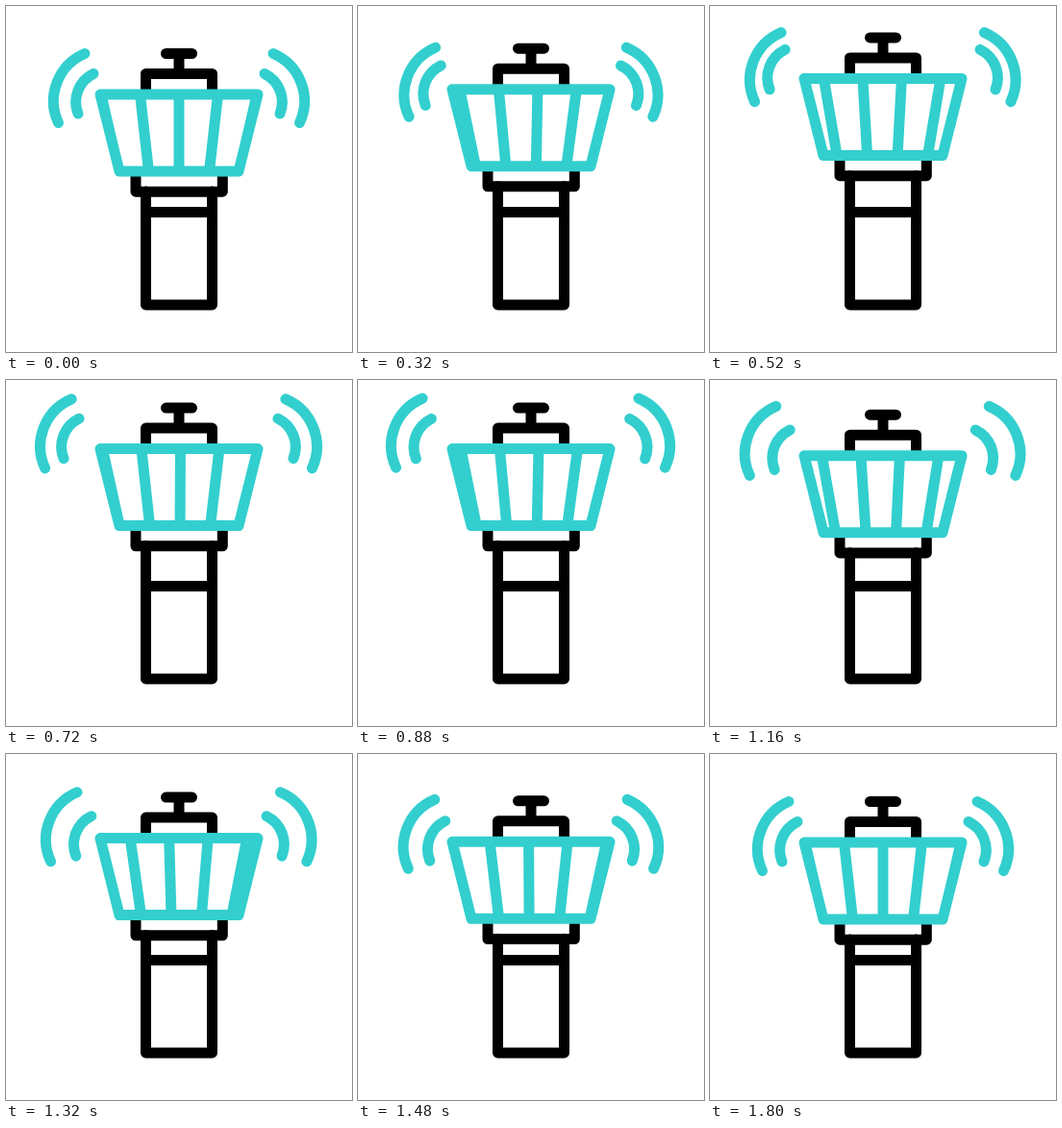
Animation, 360 px wide and 360 px high, one loop 2000 ms. Source, as an HTML page:

```html
<!DOCTYPE html>
<html lang="en">
<head>
<meta charset="utf-8">
<title>Control tower</title>
<style>
  html, body { margin: 0; width: 100%; height: 100%; overflow: hidden; background: #fff; }
  svg { display: block; width: 100%; height: 100%; }
  .line { fill: none; stroke-width: 11; stroke-linecap: round; stroke-linejoin: round; }
  .dark { stroke: #000; }
  .teal { stroke: #32cfce; }
</style>
</head>
<body>
<svg viewBox="0 0 360 360">
  <defs>
    <clipPath id="window"><path d="M98 92H262L242 172H118Z"/></clipPath>
  </defs>
  <path id="shaft" class="line dark"/>
  <path class="line dark" d="M145.5 214.5H214.5"/>
  <g id="head">
    <path class="line dark" d="M166.5 49.5H193.5M180 49.5V70M145.5 88V70.5H214.5V88M135 174V193.2H225.3V174"/>
    <path d="M98 92H262L242 172H118Z" fill="#fff"/>
    <path id="bars" class="line teal" clip-path="url(#window)"/>
    <path class="line teal" d="M98 92H262L242 172H118Z"/>
    <g id="waves" class="line teal"></g>
  </g>
</svg>
<script>
const LOOP = 2000, STEP = 40, LAST = 1800;
const byId = id => document.getElementById(id);
const shaft = byId('shaft'), head = byId('head'), bars = byId('bars'), waves = byId('waves');

const ARCS = [
  { d: 'M91 70.5A32.7 32.7 0 0 0 75 112', timing: [0, 755, 1580] },
  { d: 'M82 49.5A53.6 53.6 0 0 0 54.5 121.5', timing: [100, 920, 1740] }
];
const HEAD_TIMING = [10, 800, 1620], HEAD_RISE = 20.6;

// Window bars: time and distance travelled, counted in bar gaps
const TURN = [[0, 0], [320, .17], [720, 1.035], [1000, 3.03], [1160, 3.43], [1480, 3.94], [1720, 4]];
const GAP_TOP = 40.5, GAP_BOTTOM = 31.5;

function addPath(parent, d) {
  const path = document.createElementNS('http://www.w3.org/2000/svg', 'path');
  path.setAttribute('d', d);
  parent.append(path);
  return path;
}

for (const arc of ARCS) {
  arc.left = addPath(waves, arc.d);
  arc.right = addPath(waves, arc.d);
}

// Symmetric cubic-bezier(.6, 0, .4, 1)
function ease(x) {
  if (x <= 0) return 0;
  if (x >= 1) return 1;
  let low = 0, high = 1;
  for (let i = 0; i < 24; i++) {
    const s = (low + high) / 2, r = 1 - s;
    if (1.8 * s * r * r + 1.2 * s * s * r + s ** 3 < x) low = s; else high = s;
  }
  return low * low * (3 - 2 * low);
}

function swing(t, [start, peak, end]) {
  return t < peak
    ? ease((t - start) / (peak - start))
    : 1 - ease((t - peak) / (end - peak));
}

const slope = i => (TURN[i + 1][1] - TURN[i][1]) / (TURN[i + 1][0] - TURN[i][0]);

// Harmonic mean of neighbouring slopes keeps the curve monotone
function tangent(i) {
  if (i === 0 || i === TURN.length - 1) return 0;
  const a = slope(i - 1), b = slope(i);
  return 2 * a * b / (a + b);
}

function turn(t) {
  const i = TURN.findIndex((key, n) => n && t < key[0]) - 1;
  if (i < 0) return TURN[TURN.length - 1][1];
  const [t0, v0] = TURN[i], [t1, v1] = TURN[i + 1];
  const span = t1 - t0, s = (t - t0) / span, r = 1 - s;
  return v0 * r * r * (1 + 2 * s) + v1 * s * s * (3 - 2 * s)
    + span * s * r * (tangent(i) * r - tangent(i + 1) * s);
}

function draw(t) {
  const rise = HEAD_RISE * swing(t, HEAD_TIMING);
  head.setAttribute('transform', `translate(0 ${-rise})`);
  shaft.setAttribute('d', `M145.5 ${193 - rise}V310.9H214.5V${193 - rise}`);

  const shift = turn(t) % 1;
  let d = '';
  for (let i = -3; i <= 2; i++) {
    const x = i + shift;
    d += `M${180 + GAP_TOP * x} 92L${180 + GAP_BOTTOM * x} 172`;
  }
  bars.setAttribute('d', d);

  for (const { left, right, timing } of ARCS) {
    const p = swing(t, timing);
    left.setAttribute('transform', `translate(${-15 * p} ${-10 * p})`);
    right.setAttribute('transform', `translate(${360 + 14 * p} ${-10 * p}) scale(-1 1)`);
  }
}

const begin = performance.now();
function tick() {
  const t = (performance.now() - begin) % LOOP;
  draw(Math.min(LAST, Math.floor(t / STEP) * STEP));
  requestAnimationFrame(tick);
}
tick();
</script>
</body>
</html>
```
